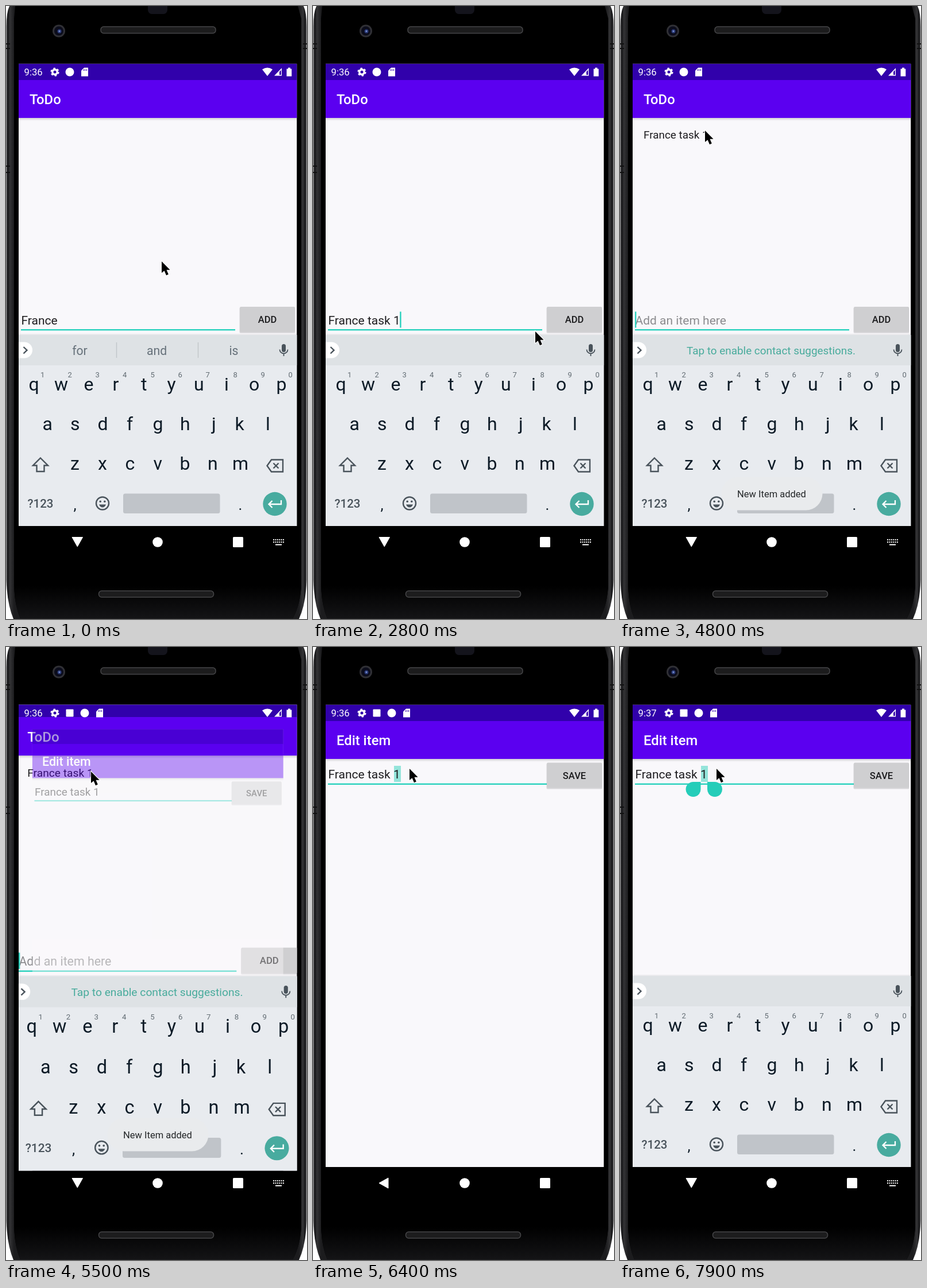
An HTML page that plays this animation: 524x1068 px, repeating every 8000 ms.

```html
<!DOCTYPE html>
<html lang="en">
<head>
<meta charset="utf-8">
<title>ToDo app</title>
<style>
  html, body { margin: 0; height: 100%; overflow: hidden; background: #fff; }
  svg { display: block; font-family: Roboto, sans-serif; }
  text { white-space: pre; }
  .mid { text-anchor: middle; }
  .title { font-size: 23.8px; font-weight: 500; fill: #fff; }
  .field { font-size: 21px; fill: #1d1c1f; }
  .btn { font-size: 16.5px; font-weight: 500; fill: #1b1b1d; }
  .key { font-size: 32px; fill: #0c1a26; }
  .digit { font-size: 13px; fill: #616b72; }
  .word { font-size: 21.2px; fill: #66717a; }
  .word.best { font-weight: 700; fill: #000; }
  .icon { fill: none; stroke: #49535b; stroke-width: 2.4; }
</style>
</head>
<body>
<svg width="524" height="1068" viewBox="0 0 524 1068">
  <defs>
    <linearGradient id="side">
      <stop offset="0" stop-color="#4a4a4c"/><stop offset=".006" stop-color="#161618"/>
      <stop offset=".012" stop-color="#343436"/><stop offset=".026" stop-color="#1c1c1e"/>
      <stop offset=".974" stop-color="#1c1c1e"/><stop offset=".988" stop-color="#343436"/>
      <stop offset=".994" stop-color="#161618"/><stop offset="1" stop-color="#4a4a4c"/>
    </linearGradient>
    <linearGradient id="bottom" x2="0" y2="1">
      <stop offset="0" stop-color="#000"/><stop offset="1" stop-color="#141416"/>
    </linearGradient>
    <linearGradient id="shade" x2="0" y2="1">
      <stop offset="0" stop-color="#000" stop-opacity=".16"/><stop offset="1" stop-color="#000" stop-opacity="0"/>
    </linearGradient>
    <clipPath id="screen"><rect x="22" y="100.5" width="484.5" height="867.5"/></clipPath>
    <g id="bars">
      <rect x="22" y="100.5" width="484.5" height="805.5" fill="#f9f8fb"/>
      <rect x="22" y="100.5" width="484.5" height="29" fill="#3101ab"/>
      <rect x="22" y="129" width="484.5" height="66" fill="#5b00f0"/>
      <rect x="22" y="195" width="484.5" height="5" fill="url(#shade)"/>
    </g>
    <g id="button">
      <rect x="406.5" y="1" width="97" height="45" rx="2" fill="#000" opacity=".13"/>
      <rect x="407" width="96" height="44" rx="2" fill="#cfcfd1"/>
    </g>
  </defs>

  <!-- phone -->
  <path d="M6 0H518Q523.500 12 523.500 36V1000Q522 1042 510 1068H13Q2 1042 .5 1000V36Q.5 12 6 0Z" fill="url(#side)"/>
  <path d="M16 0H508L514 22V1010Q512 1045 499 1067H25Q15 1045 14 1010V22Z"/>
  <path d="M14 1010H514Q512 1045 499 1067H25Q15 1045 14 1010Z" fill="url(#bottom)"/>
  <path d="M0 66H7M0 74H7M0 279H7M0 290H7M517 66H524M517 74H524" stroke="#111" stroke-width="2"/>
  <path d="M247 0H281V7Q280 14 274 14H254Q248 14 247 7Z" fill="#14141c"/>
  <g fill="#1c1c1d" stroke="#464648" stroke-width="1.5">
    <rect x="165" y="36" width="200" height="11.5" rx="5"/>
    <rect x="161.5" y="1019" width="200" height="11" rx="5"/>
  </g>
  <circle cx="92" cy="43.5" r="11" fill="#303035"/>
  <circle cx="92" cy="43.5" r="8" fill="#0b0c1b"/>
  <circle cx="93" cy="44" r="3.5" fill="#2a3a78"/>
  <circle cx="93" cy="44" r="1.4" fill="#7f94d0"/>

  <g clip-path="url(#screen)">
    <g id="list">
      <use href="#bars"/>
      <text class="title" x="41" y="171">ToDo</text>
      <text id="item" x="41" y="231" font-size="18.9" fill="#1d1c1f">France task 1</text>
      <text class="field" x="26.5" y="555"><tspan id="typed"></tspan><tspan id="composing" text-decoration="underline"></tspan></text>
      <text id="hint" class="field" x="26.5" y="555" style="fill:#8b8b8e">Add an item here</text>
      <rect x="26" y="563" width="373" height="2.4" fill="#29d1bd"/>
      <rect id="caret" y="532.5" width="2.4" height="28" fill="#29d1bd"/>
      <use href="#button" y="524"/>
      <rect id="press" x="407" y="524" width="96" height="44" rx="2"/>
      <text class="btn mid" x="455" y="551.8">ADD</text>
    </g>

    <g id="edit">
      <rect x="22" y="906" width="484.5" height="62"/>
      <use href="#bars"/>
      <text class="title" x="41" y="171">Edit item</text>
      <rect x="26" y="237.6" width="382" height="2.4" fill="#29d1bd"/>
      <rect id="selection" x="141" y="207" width="12" height="28" fill="#94e4da"/>
      <text class="field" x="26.5" y="229">France task 1</text>
      <path id="handles" d="M140.5 235V248A13 13 0 1 1 127.5 235ZM152 235H165A13 13 0 1 1 152 248Z" fill="#25cdb9"/>
      <use href="#button" y="201.5"/>
      <text class="btn mid" x="455" y="230">SAVE</text>
    </g>

    <g id="keyboard">
      <rect x="22" y="571" width="484.5" height="3" fill="#000" opacity=".05"/>
      <rect x="22" y="573" width="484.5" height="333" fill="#e8ebef"/>
      <rect x="22" y="573" width="484.5" height="53" fill="#dee2e5"/>
      <path d="M22 585.5H32A14 14 0 0 1 32 613.5H22Z" fill="#fff"/>
      <path class="icon" d="M30.5 594L36.5 599.7L30.5 605.5"/>
      <path id="dividers" d="M192.5 586V613M334.5 586V613" stroke="#c0c5c9" stroke-width="1.4"/>
      <text class="word mid" x="128.5" y="607.5"></text>
      <text class="word mid" x="262.5" y="607.5"></text>
      <text class="word mid" x="396.5" y="607.5"></text>
      <text id="tip" class="mid" x="263" y="607" font-size="18.9" fill="#48ab9c">Tap to enable contact suggestions.</text>
      <rect x="480" y="589" width="7" height="14" rx="3.5" fill="#49535b"/>
      <path class="icon" style="stroke-width:1.8" d="M476.5 598.5A7 7 0 0 0 490.5 598.5M483.5 605.5V610"/>
      <g id="keys"></g>
      <path class="icon" d="M60 787.5L73 800.5H66.5V811H53.5V800.5H47Z"/>
      <path class="icon" d="M462 790.5H482V811.5H462L454.5 801ZM465.5 796.5L474.5 805.5M474.5 796.5L465.5 805.5"/>
      <text class="mid" x="60" y="874" font-size="20.5" font-weight="500" fill="#49535b">?123</text>
      <text class="mid key" x="120" y="878" style="font-size:26px">,</text>
      <text class="mid key" x="408" y="878" style="font-size:26px">.</text>
      <circle class="icon" cx="168" cy="866.5" r="11"/>
      <path d="M162 868.500H174Q172 873.500 168 873.500T162 868.500Z" fill="#49535b"/>
      <circle cx="164.2" cy="863.2" r="1.8" fill="#49535b"/>
      <circle cx="171.8" cy="863.2" r="1.8" fill="#49535b"/>
      <rect x="204" y="849.5" width="168.5" height="34.5" rx="3.5" fill="#c0c4c9"/>
      <circle cx="468" cy="867.5" r="20.7" fill="#48ab9f"/>
      <path d="M479 861V868H457.5M463.5 862L457.5 868L463.5 874" fill="none" stroke="#fff" stroke-width="2.3"/>
    </g>
  </g>

  <!-- status bar -->
  <g fill="#fff">
    <text id="clock" x="31.5" y="121.3" font-size="16.7"></text>
    <circle cx="85" cy="115" r="4.2" fill="none" stroke="#fff" stroke-width="3.4"/>
    <circle cx="85" cy="115" r="6.5" fill="none" stroke="#fff" stroke-width="2.2" stroke-dasharray="3.4 3.407"/>
    <rect id="badge" x="104.5" y="108.5" width="13" height="13" rx="1"/>
    <g id="notices">
      <circle cx="111" cy="115" r="7.5"/>
      <path d="M136 107.5H143V122.5H131V112.5Z"/>
      <path d="M135.5 110V113M138 110V113M140.5 110V113" stroke="#3101ab"/>
    </g>
    <path d="M446 110.5Q455 104.5 464 110.5L455 122Z"/>
    <path d="M467 121.5L480 108V121.5ZM476 114.5V120H478.8V111.5Z" fill-rule="evenodd"/>
    <path d="M488.5 109.5H491V107.5H495V109.5H497.3V122.5H488.5Z"/>
  </g>

  <!-- navigation bar -->
  <g fill="#fff">
    <path id="back" stroke="#fff" stroke-linejoin="round"/>
    <circle cx="264" cy="934" r="8.8"/>
    <rect x="395" y="925" width="18" height="18" rx="1.5"/>
    <g id="switcher">
      <path d="M465 930H484M465 934H484" stroke="#fff" stroke-width="2" stroke-dasharray="2 1.4"/>
      <path d="M469 938.5H480" stroke="#fff" stroke-width="2"/>
    </g>
  </g>

  <g id="toast">
    <rect x="176.5" y="820.5" width="176" height="58" rx="29" fill="#e9ebed"/>
    <text class="mid" x="264" y="855.5" font-size="16.5" fill="#232628">New Item added</text>
  </g>
  <path id="pointer" d="M0 0V20L4.6 16.2L8 24.2L11.8 22.6L8.5 14.8H14.6Z" stroke="#fff" stroke-width="2" paint-order="stroke"/>
</svg>

<script>
const LOOP = 8000, STEP = 100;
const $ = id => document.getElementById(id);
const words = document.querySelectorAll('.word');

// key labels are centred on their ink, not on their advance width
const pen = document.createElement('canvas').getContext('2d');
function label(cls, size, x, y, s) {
  pen.font = `${size}px Roboto, sans-serif`;
  const m = pen.measureText(s);
  const left = x + (m.actualBoundingBoxLeft - m.actualBoundingBoxRight) / 2;
  return `<text class="${cls}" x="${left}" y="${y}">${s}</text>`;
}
const row = (cls, size, x, y, s) => [...s].map((c, i) => label(cls, size, x + 48 * i, y, c)).join('');
$('keys').innerHTML = row('key', 32, 48, 670, 'qwertyuiop') + row('digit', 13, 63, 647, '1234567890') +
  row('key', 32, 72, 739, 'asdfghjkl') + row('key', 32, 120, 808, 'zxcvbnm');

// time, committed text, word being composed, suggestions
const typing = [
  [0, 'France ', '', 'for and is'],
  [800, 'France ', 't', 't the to'],
  [1000, 'France ', 'ta', 'ta take talk'],
  [1200, 'France ', 'tas', 'tas taste task'],
  [1400, 'France ', 'task', 'task tasks asked'],
  [1500, 'France task ', '', 'for and is'],
  [1700, 'France task 1', '', ''],
  [3500, '', '', '']
];

// time, x, y of the pointer tip
const moves = [
  [0, 271, 445], [2400, 271, 445], [2800, 387, 567], [3100, 452, 549],
  [3900, 452, 549], [4600, 148, 217], [5900, 148, 217], [6200, 168, 212], [LOOP, 168, 212]
];

const ramp = (t, from, to) => Math.min(1, Math.max(0, (t - from) / (to - from)));
const show = (id, amount) => $(id).setAttribute('opacity', +amount);
const zoom = (id, s, dy = 0) =>
  $(id).setAttribute('transform', `translate(264.5 ${534.5 + dy}) scale(${s}) translate(-264.5 -534.5)`);

function drawInput(t) {
  const [since, text, composing, hints] = typing.findLast(k => t >= k[0]);
  $('typed').textContent = text;
  $('composing').textContent = composing;
  show('hint', !text);
  show('caret', since ? (t - since) % 1000 < 500 : t >= 100);
  $('caret').setAttribute('x', 26 + $('typed').parentNode.getComputedTextLength());

  const list = hints.split(' ');
  words.forEach((w, i) => {
    w.textContent = list[i] || '';
    w.classList.toggle('best', i === 1 && composing !== '');
  });
  show('dividers', hints !== '');
  show('tip', t >= 3500 && t < 6000);
}

function drawPointer(t) {
  const i = moves.findIndex(m => m[0] > t);
  const [t0, x0, y0] = moves[i - 1], [t1, x1, y1] = moves[i];
  const p = ramp(t, t0, t1);
  $('pointer').setAttribute('transform', `translate(${x0 + (x1 - x0) * p} ${y0 + (y1 - y0) * p})`);
}

function draw(t) {
  drawInput(t);
  drawPointer(t);
  show('item', t >= 3500);
  show('press', t >= 3400 && t < 3700 ? .12 : 0);

  // the edit screen grows in over the list
  const open = 1 - (1 - ramp(t, 5460, 5860)) ** 4;
  zoom('list', 1 + .05 * open);
  zoom('edit', .85 + .15 * open);
  show('list', t < 5900);
  show('edit', ramp(t, 5460, 5560));
  show('selection', t >= 6300);
  show('handles', t >= 6600);

  const rise = ramp(t, 6600, 6800);
  const leaving = t < 6000;
  show('keyboard', leaving ? 1 - ramp(t, 5600, 5800) : rise);
  zoom('keyboard', leaving ? 1 + .05 * open : 1, leaving ? 0 : 40 * (1 - rise));
  show('toast', ramp(t, 3600, 3900) * (1 - ramp(t, 5600, 5800)));

  const notified = t >= 5400;
  show('badge', notified);
  $('notices').setAttribute('transform', `translate(${notified ? 26 : 0} 0)`);
  $('clock').textContent = t < 7500 ? '9:36' : '9:37';

  const typingMode = t < 5800 || t >= 6700;
  show('switcher', typingMode);
  $('back').setAttribute('d', typingMode ? 'M115 925.5H133.5L124.3 942Z' : 'M131 925V943L115 934Z');
}

const start = performance.now();
function tick() {
  const t = (performance.now() - start) % LOOP;
  draw(Math.floor(t / STEP) * STEP);
  requestAnimationFrame(tick);
}
tick();
</script>
</body>
</html>
```
